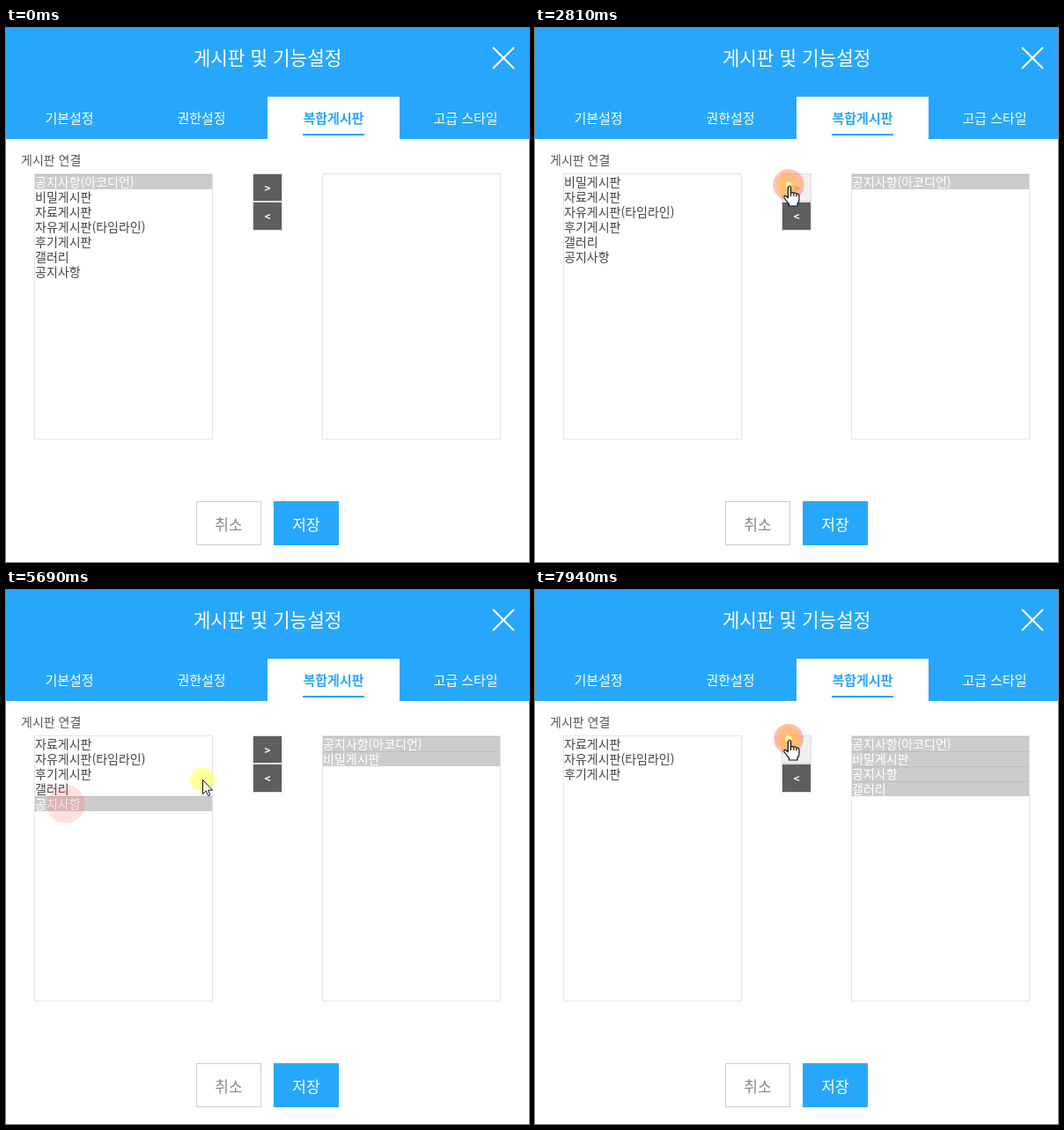
Animation, 594 px wide and 606 px high, one loop 8 s. Source, as an HTML page:

```html
<!DOCTYPE html>
<html lang="ko">
<head>
<meta charset="utf-8">
<title>게시판 설정</title>
<style>
html, body { margin: 0; width: 100%; height: 100%; overflow: hidden; background: #fff; }
body { position: relative; font: 14px/17px "Noto Sans CJK KR", "Noto Sans CJK", sans-serif; color: #444; cursor: default; }
body > * { position: absolute; box-sizing: border-box; white-space: nowrap; }
header { left: 0; top: 0; width: 594px; height: 126px; background: #27a7fc; color: #fff; }
header > * { position: absolute; text-align: center; }
h1 { left: 0; top: 17px; width: 594px; margin: 0; font-size: 21.3px; font-weight: 400; line-height: 32px; }
.tab { top: 78px; width: 150px; height: 48px; font-size: 15px; font-weight: 500; line-height: 48px; }
.on { background: #fff; color: #27a7fc; font-weight: 700; }
.on::after { content: ""; position: absolute; left: 40px; top: 42px; width: 70px; height: 2px; background: #27a7fc; }
.label { left: 17px; top: 141px; color: #555; }
.list { top: 165px; width: 203px; height: 302px; border: 1px solid #e5e5e5; }
.list div { height: 17px; }
.sel { background: #ccc; color: #fff; box-shadow: inset 0 1px #bebebe; }
.move { left: 280px; width: 34px; border: 1px solid #ddd; background: #5e5e5e; color: #fff; font-size: 12px; font-weight: 700; text-align: center; }
.move.hover { background: #efefef; color: #5e5e5e; }
.btn { top: 537px; width: 74px; height: 50px; font-size: 17px; line-height: 52px; text-align: center; }
.cancel { left: 216px; border: 1px solid #ccc; line-height: 50px; color: #888; }
.save { left: 304px; background: #27a7fc; color: #fff; font-weight: 500; }
#layer { left: 0; top: 0; }
</style>
</head>
<body>
<header>
  <h1>게시판 및 기능설정</h1>
  <svg style="left:550px;top:19px" width="30" height="30"><path d="M3 3 27 27M27 3 3 27" stroke="#fff" stroke-width="2"/></svg>
  <div class="tab" style="left:-3px">기본설정</div>
  <div class="tab" style="left:147px">권한설정</div>
  <div class="tab on" style="left:297px">복합게시판</div>
  <div class="tab" style="left:447px">고급 스타일</div>
</header>
<div class="label">게시판 연결</div>
<div class="list" id="left" style="left:32px"></div>
<div class="list" id="right" style="left:359px"></div>
<div class="move" id="add" style="top:165px;height:32px;line-height:32px">&gt;</div>
<div class="move" style="top:197px;height:33px;line-height:32px">&lt;</div>
<div class="btn cancel">취소</div>
<div class="btn save">저장</div>
<svg id="layer" width="594" height="606">
  <circle id="halo" r="14" fill="#ffff64" fill-opacity=".65"/>
  <g id="ripples" fill="none" stroke="#ff5a50"></g>
  <g id="cursor" fill="#fff" stroke="#111" stroke-linejoin="round">
    <path id="arrow" d="M.5 .5V16.5L4.2 13 6.7 18.6 8.9 17.6 6.5 12.2H11.5Z"/>
    <path id="ibeam" fill="none" stroke="#222" d="M-1.5-7.5H.5L1.5-6.5 2.5-7.5H5M1.5-6.5V7.5M-1.5 8.5H.5L1.5 7.5 2.5 8.5H5"/>
    <path id="hand" stroke-width="1.2" d="M-.6 2.5Q1 0 2.6 2.5V9Q5 8 5.9 9.4 7.8 8.2 9 10.3 11.6 9.6 12 12.3V17Q11.8 19.5 10 21.5V24H.5V22Q-2 19-5 14.5-5.6 12-3.2 12.5L-.6 14.7ZM5.9 9.6V13M9 10.5V13.5M2.6 9V13"/>
  </g>
</svg>
<script>
const LOOP = 8000, ENTER = 880, ROW = 17, TOP = 166, BUTTON_X = 288;
const HOLD = 90, RIPPLE = 450;
const $ = id => document.getElementById(id);
const boards = ["공지사항(아코디언)", "비밀게시판", "자료게시판", "자유게시판(타임라인)", "후기게시판", "갤러리", "공지사항"];

// Each round picks a board in the left list, then presses the add button.
const rounds = [
  { board: 0, x: 130, pick: 1920, add: 2600, buttonY: 178 },
  { board: 1, x: 113, pick: 3880, add: 4440, buttonY: 182 },
  { board: 6, x: 68, pick: 5270, add: 6000, buttonY: 188 },
  { board: 5, x: 117, pick: 6990, add: 7750, buttonY: 169 }
];

// Pointer moves and clicks follow from the rounds.
const moves = [], clicks = [];
let at = [116, 442];
const move = (from, to, point) => { moves.push({ from, to, start: at, end: point }); at = point; };
const click = (time, hold) => clicks.push({ time, hold, point: at });

move(ENTER, 1130, [160, 359]);
let leave = 1440;
const remaining = boards.map((_, i) => i);
for (const r of rounds) {
  const row = remaining.indexOf(r.board);
  remaining.splice(row, 1);
  move(leave, r.pick - 140, [r.x, TOP + ROW * row + 9]);
  click(r.pick, HOLD);
  move(r.pick + 215, r.pick + 535, [BUTTON_X, r.buttonY]);
  click(r.add, 0);
  leave = r.add + 465;
}

const rings = clicks.map(({ point: [cx, cy] }) => {
  const ring = document.createElementNS("http://www.w3.org/2000/svg", "circle");
  set(ring, { cx, cy });
  return $("ripples").appendChild(ring);
});

function set(el, attrs) { for (const k in attrs) el.setAttribute(k, attrs[k]); }
const show = (el, on) => { el.style.display = on ? "" : "none"; };

function pointer(t) {
  const m = moves.findLast(m => t >= m.from) || moves[0];
  const u = Math.min(1, Math.max(0, (t - m.from) / (m.to - m.from)));
  const s = u * u * (3 - 2 * u);
  const [x, y] = m.start.map((a, i) => a + (m.end[i] - a) * s);
  return [x, y + 14 * Math.sin(Math.PI * s)];
}

let lastKey = "";
function drawLists(t) {
  const moved = rounds.filter(r => t >= r.add + 80).map(r => r.board);
  const picked = rounds.filter((r, i) => i === 0 || t >= r.pick + HOLD).map(r => r.board);
  const key = moved + "|" + picked;
  if (key === lastKey) return;
  lastKey = key;
  const row = (i, on) => `<div${on ? ' class="sel"' : ""}><span>${boards[i]}</span></div>`;
  $("left").innerHTML = boards.map((_, i) => moved.includes(i) ? "" : row(i, picked.includes(i))).join("");
  $("right").innerHTML = moved.map(i => row(i, true)).join("");
}

function overText(x, y) {
  const row = $("left").children[Math.floor((y - TOP) / ROW)];
  return !!row && x >= 33 && x < 33 + row.firstChild.offsetWidth;
}

function drawPointer(t) {
  const on = t >= ENTER;
  const [x, y] = pointer(t);
  const level = y >= 165 && y <= 197;
  const hand = level && x >= 271 && x <= 314;
  const text = !hand && overText(x, y);
  show($("halo"), on);
  show($("cursor"), on);
  show($("hand"), hand);
  show($("ibeam"), text);
  show($("arrow"), !hand && !text);
  set($("halo"), { cx: x, cy: y });
  set($("cursor"), { transform: `translate(${Math.round(x)} ${Math.round(y)})` });
  $("add").classList.toggle("hover", on && level && x >= 281 && x <= 313);
}

function drawRipples(t) {
  clicks.forEach(({ time, hold }, i) => {
    const u = Math.max(0, (t - time - hold) / RIPPLE);
    const grow = Math.min(1, u / 0.75);
    const outer = 10.5 + 11.5 * grow, inner = 9 * (1 - grow);
    show(rings[i], t >= time && u < 1);
    set(rings[i], { r: (outer + inner) / 2, "stroke-width": outer - inner, "stroke-opacity": Math.max(0, 0.7 * (1 - u)) });
  });
}

function draw(t) {
  drawLists(t);
  drawPointer(t);
  drawRipples(t);
}

let start;
function frame(now) {
  start ??= now;
  draw(Math.max(0, now - start) % LOOP);
  requestAnimationFrame(frame);
}
draw(0);
requestAnimationFrame(frame);
</script>
</body>
</html>
```
